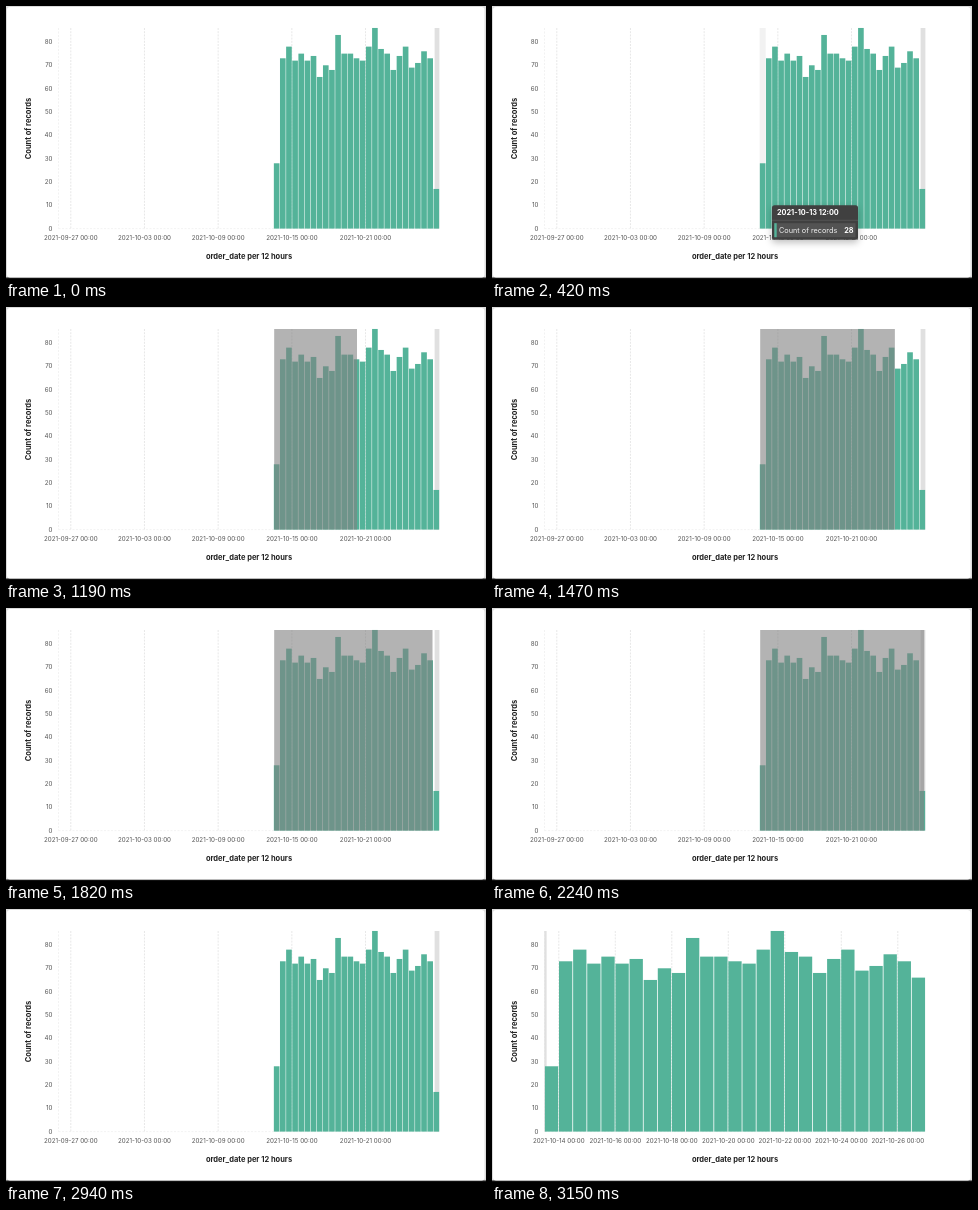
Recreate the animation shown at these times as an HTML page with a canvas. Size 480 by 273 pixels, loop 3.64 s.

```html
<!DOCTYPE html>
<html lang="en">
<head>
<meta charset="utf-8">
<title>Order histogram</title>
<style>
html, body { margin: 0; width: 100%; height: 100%; overflow: hidden; background: #dcdcdc; }
canvas { display: block; width: 480px; height: 273px; }
</style>
</head>
<body>
<canvas id="stage"></canvas>
<script>
const W = 480, H = 273, LOOP = 3640, STEP = 70;
const canvas = document.getElementById('stage');
const ctx = canvas.getContext('2d');
const ratio = window.devicePixelRatio || 1;
canvas.width = W * ratio;
canvas.height = H * ratio;

const TOP = 22, BASE = 222.6, UNIT = 2.333;
const LEFT = 52.5, RIGHT = 433.4;
const GREEN = '#54b399';
const counts = [28, 73, 78, 72, 75, 72, 74, 65, 70, 68, 83, 75, 75, 73,
  72, 78, 86, 77, 75, 68, 74, 78, 69, 71, 76, 73];

const wide = {
  x: 267.6, bar: 6.14, gap: 0.5, last: 17, partial: [428.6, 433.4],
  ticks: ['09-27', '10-03', '10-09', '10-15', '10-21'], tickX: 64.8, tickStep: 73.68
};
const zoomed = {
  x: 52.5, bar: 14.11, gap: 0.8, last: 66, partial: [52.3, 54.6],
  ticks: ['10-14', '10-16', '10-18', '10-20', '10-22', '10-24', '10-26'], tickX: 66.8, tickStep: 56.5
};

function rect(x, y, w, h, color) {
  ctx.fillStyle = color;
  ctx.fillRect(x, y, w, h);
}

function rounded(x, y, w, h, r, color) {
  ctx.fillStyle = color;
  ctx.beginPath();
  ctx.roundRect(x, y, w, h, r);
  ctx.fill();
}

function text(str, x, y, size, color, align = 'left', weight = 400) {
  ctx.font = `${weight} ${size}px Inter, sans-serif`;
  ctx.textAlign = align;
  ctx.textBaseline = 'alphabetic';
  ctx.fillStyle = color;
  ctx.fillText(str, x, y);
}

function line(x1, y1, x2, y2, color, dash = []) {
  ctx.strokeStyle = color;
  ctx.lineWidth = 0.7;
  ctx.setLineDash(dash);
  ctx.beginPath();
  ctx.moveTo(x1, y1);
  ctx.lineTo(x2, y2);
  ctx.stroke();
  ctx.setLineDash([]);
}

function drawCard() {
  rect(0, 0, W, H, '#dcdcdc');
  rect(0, 271.5, W, 1.5, '#111');
  rounded(1, 1, 477.5, 270.5, 3, '#fff');
}

function drawAxes(view) {
  line(LEFT, TOP, LEFT, BASE, '#ececec', [2, 1.5]);
  line(LEFT, BASE, RIGHT, BASE, '#eeeeee', [2, 1.5]);
  for (let n = 0; n <= 80; n += 10) {
    text(n, 46.5, BASE - n * UNIT + 2.2, 6.2, '#555', 'right');
  }
  view.ticks.forEach((day, i) => {
    const x = view.tickX + i * view.tickStep;
    line(x, TOP, x, BASE, '#dedede', [2, 1.2]);
    text(`2021-${day} 00:00`, x, 234.3, 6.2, '#555', 'center');
  });
  text('order_date per 12 hours', 243, 252.6, 7.5, '#222', 'center', 700);
  ctx.save();
  ctx.translate(25, 122.5);
  ctx.rotate(-Math.PI / 2);
  text('Count of records', 0, 0, 7.5, '#222', 'center', 700);
  ctx.restore();
}

function drawBars(view) {
  const [a, b] = view.partial;
  rect(a, TOP, b - a, BASE - TOP, '#e0e0e0');
  [...counts, view.last].forEach((n, i) => {
    const x = view.x + i * view.bar;
    rect(x + view.gap / 2, BASE - n * UNIT, view.bar - view.gap, n * UNIT, GREEN);
  });
}

function drawTooltip(alpha) {
  if (alpha <= 0) return;
  ctx.save();
  ctx.globalAlpha = alpha;
  ctx.shadowColor = 'rgba(0,0,0,0.25)';
  ctx.shadowBlur = 7 * ratio;
  ctx.shadowOffsetY = 3 * ratio;
  rounded(280, 199.3, 86, 34.4, 2.5, '#404040');
  ctx.shadowColor = 'transparent';
  line(280, 214.3, 366, 214.3, '#5c5c5c');
  rect(282.3, 217.2, 81.2, 14, '#535353');
  rect(282.3, 217.2, 2.4, 14, GREEN);
  text('2021-10-13 12:00', 285, 209.4, 7.3, '#fff', 'left', 700);
  text('Count of records', 287, 226.8, 7.3, '#eee');
  text('28', 361.5, 226.8, 7.3, '#fff', 'right', 700);
  ctx.restore();
}

// Right edge of the selection as the pointer drags, slows and settles.
function brushEdge(t) {
  if (t < 840) return 268 + 17 * (t - 700) / 140;
  if (t < 1190) return 285 + 66 * (t - 840) / 350;
  if (t < 1260) return 351 + 15 * (t - 1190) / 70;
  if (t < 1820) {
    const rest = 1 - (t - 1260) / 560;
    return 366 + 60.5 * (1 - rest * rest);
  }
  if (t < 2100) return 426.5 + 5 * (t - 1820) / 280;
  if (t < 2240) return 431.5;
  return t < 2310 ? 432.2 : t < 2520 ? 432.8 : 433.4;
}

function drawBrush(t) {
  if (t < 770 || t >= 2800) return;
  const alpha = t < 2730 ? 0.6 : 0.3;
  rect(268.2, TOP, brushEdge(t) - 268.2, BASE - TOP, `rgba(128,128,128,${alpha})`);
}

function tooltipAlpha(t) {
  if (t < 560) return Math.min(1, t / 350);
  return t < 630 ? 0.5 : 0;
}

function draw(t) {
  const view = t < 3010 ? wide : zoomed;
  const hover = tooltipAlpha(t);
  ctx.setTransform(ratio, 0, 0, ratio, 0, 0);
  drawCard();
  drawAxes(view);
  if (hover) rect(wide.x, TOP, wide.bar, BASE - TOP, `rgba(0,0,0,${0.05 * hover})`);
  drawBars(view);
  drawBrush(t);
  drawTooltip(hover);
}

const start = performance.now();
function frame() {
  const t = (performance.now() - start) % LOOP;
  draw(Math.floor(t / STEP) * STEP);
  requestAnimationFrame(frame);
}
frame();
</script>
</body>
</html>
```
